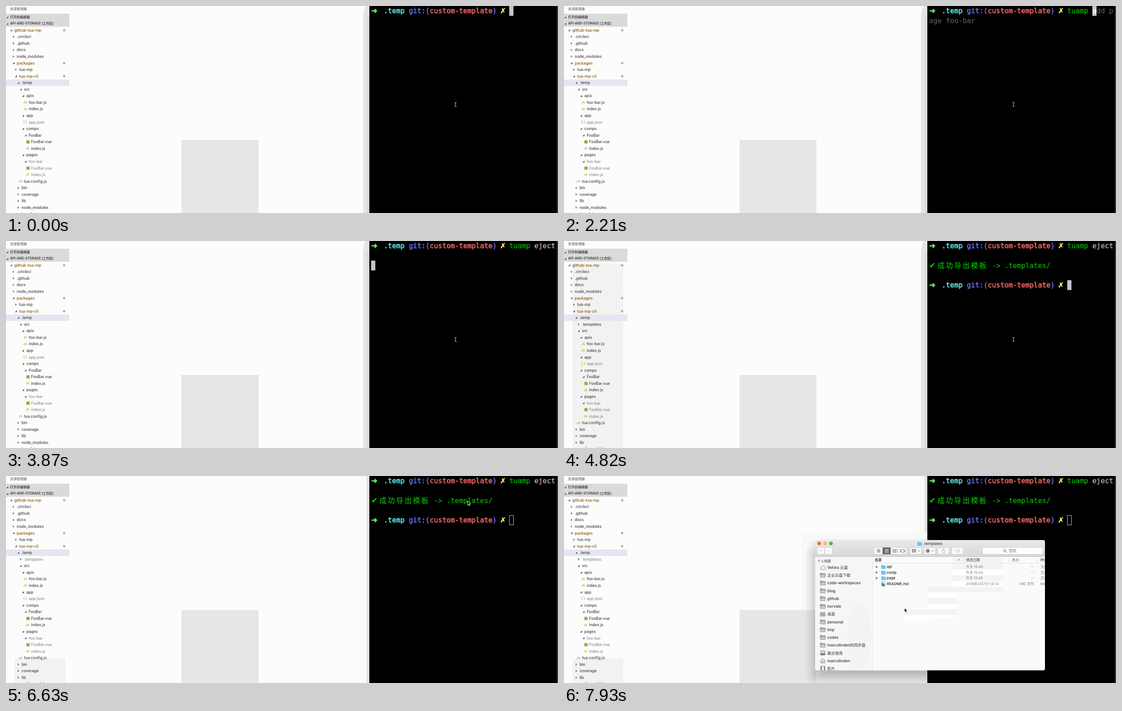
An HTML page with a canvas for the animation above (8 s loop, 1220 by 459 pixels).

```html
<!DOCTYPE html>
<html lang="zh">
<head>
<meta charset="utf-8">
<title>Template export</title>
<style>
html, body { margin: 0; width: 100%; height: 100%; overflow: hidden; background: #fcfcfc; }
canvas { display: block; width: 1220px; height: 459px; }
</style>
</head>
<body>
<canvas id="stage"></canvas>
<script>
const W = 1220, H = 459, LOOP = 8000;
const canvas = document.getElementById('stage');
const dpr = window.devicePixelRatio || 1;
canvas.width = W * dpr;
canvas.height = H * dpr;
const c = canvas.getContext('2d');

const SANS = 'Inter, "Noto Sans CJK SC", "Noto Sans CJK", sans-serif';
const MONO = '"DejaVu Sans Mono", "Noto Sans Mono", "Noto Sans CJK SC", monospace';
const SIGNS = '"DejaVu Sans", sans-serif';

// ---------- helpers ----------
function rect(x, y, w, h, fill) {
  c.fillStyle = fill;
  c.fillRect(x, y, w, h);
}
function round(x, y, w, h, r, fill, stroke) {
  c.beginPath();
  c.roundRect(x, y, w, h, r);
  if (fill) { c.fillStyle = fill; c.fill(); }
  if (stroke) { c.strokeStyle = stroke; c.lineWidth = 0.8; c.stroke(); }
}
function poly(points, fill, stroke, open) {
  c.beginPath();
  points.forEach(([x, y]) => c.lineTo(x, y));
  if (!open) c.closePath();
  if (fill) { c.fillStyle = fill; c.fill(); }
  if (stroke) { c.strokeStyle = stroke; c.stroke(); }
}
function disc(x, y, r, fill) {
  c.beginPath();
  c.arc(x, y, r, 0, 7);
  c.fillStyle = fill;
  c.fill();
}
function text(s, x, mid, size, fill, weight = 400, align = 'left') {
  c.font = `${weight} ${size}px ${SANS}`;
  c.textAlign = align;
  c.fillStyle = fill;
  c.fillText(s, x, mid + size * 0.35);
}
// Latest entry of a [time, ...values] list that has started.
const latest = (list, t) => list.filter(e => e[0] <= t).pop();

// ---------- file tree ----------
// depth, name, state: m modified, i ignored, + collapsed folder
const tree = [
  [0, 'github-tua-mp', 'm'], [1, '.circleci', '+'], [1, '.github', '+'], [1, 'docs', '+'],
  [1, 'node_modules', '+'], [1, 'packages', 'm'], [2, 'tua-mp', '+'], [2, 'tua-mp-cli', 'm'],
  [3, '.temp', ''], [4, 'src', ''], [5, 'apis', ''], [6, 'foo-bar.js', ''], [6, 'index.js', ''],
  [5, 'app', ''], [6, 'app.json', 'i'], [5, 'comps', ''], [6, 'FooBar', ''],
  [7, 'FooBar.vue', ''], [7, 'index.js', ''], [5, 'pages', ''], [6, 'foo-bar', 'i'],
  [7, 'FooBar.vue', 'i'], [7, 'index.js', 'i'], [4, 'tua.config.js', ''],
  [3, 'bin', '+'], [3, 'coverage', '+'], [3, 'lib', '+'], [3, 'node_modules', '+'], [3, 'templates', '+']
];

function treeIcon(name, state, x, y) {
  const icon = '#b5b53a';
  if (/\.js$/.test(name)) text('JS', x - 8, y, 6.6, icon, 700, 'center');
  else if (/\.json$/.test(name)) text('{ }', x - 8, y - 0.5, 7.4, icon, 700, 'center');
  else if (/\.vue$/.test(name)) rect(x - 10.5, y - 3.5, 7, 7, '#80b53c');
  else if (state.includes('+')) poly([[x - 8.5, y - 2.8], [x - 5.5, y], [x - 8.5, y + 2.8]], '#6a6a6a');
  else poly([[x - 5, y - 2.3], [x - 5, y + 2], [x - 9.3, y + 2]], '#505050');
}

function explorer(t) {
  if (t >= 4820) {
    const top = t < 6490 ? 50 : 405;
    rect(19, top, 112, H - top, '#f2f2f2');
  }
  text('资源管理器', 9, 6, 7.4, '#555');
  rect(0, 17, 140, 29, '#dadada');
  text('打开的编辑器', 9, 24.5, 7.3, '#4b4b4b', 700);
  text('API-AND-STORAGE (工作区)', 9, 39, 7.1, '#4b4b4b', 700);
  for (const y of [25, 39.5]) poly([[5, y - 2.3], [5, y + 2], [0.8, y + 2]], '#505050');
  rect(0, 163, 140, 14.3, '#e4e6f1');

  const rows = tree.slice();
  if (t >= 4820) rows.splice(9, 0, [4, '.templates', t < 5530 ? '+' : '+i']);
  rows.forEach(([depth, name, state], i) => {
    const x = 18.5 + depth * 5.3, y = 53.8 + i * 14.56;
    const modified = state.includes('m');
    treeIcon(name, state, x, y);
    text(name, x, y, 8.5, modified ? '#895503' : state.includes('i') ? '#8e8e90' : '#424242', 500);
    if (modified) disc(128.5, y, 2.6, '#c7ac84');
  });
}

// ---------- terminal ----------
const CW = 9.25, CH = 21.75, TX = 807, COLS = 44;
const typing = [
  [0, ''], [1620, 'tu'], [1740, 'tua'], [1970, 'tuam'], [2090, 'tuamp'], [2210, 'tuamp '],
  [2570, 'tuamp e'], [2690, 'tuamp ej'], [2800, 'tuamp eje'], [3030, 'tuamp ejec'], [3270, 'tuamp eject']
];

function mono(s, col, row, fill, heavy = 0, font = `15.37px ${MONO}`) {
  const x = TX + col * CW, y = row * CH + 16.4;
  c.font = font;
  c.textAlign = 'left';
  c.fillStyle = c.strokeStyle = fill;
  c.fillText(s, x, y);
  if (heavy) {
    c.lineWidth = heavy;
    c.lineJoin = 'round';
    c.strokeText(s, x, y);
  }
}
const sign = (s, col, row, fill, size) => mono(s, col, row, fill, 0.5, `${size}px ${SIGNS}`);

function prompt(row) {
  const part = (s, col, fill) => mono(s, col, row, fill, 0.5);
  sign('➜', 0, row, '#5ffa68', 17);
  part('.temp', 3, '#60fdff');
  part('git:(', 9, '#6871ff');
  part('custom-template', 14, '#ff6d67');
  part(')', 29, '#6871ff');
  sign('✗', 30.8, row, '#fffc67', 15.4);
}
function block(col, row, hollow) {
  const x = TX + col * CW, y = row * CH;
  if (hollow) {
    c.strokeStyle = '#c7c7c7';
    c.lineWidth = 1;
    c.strokeRect(Math.round(x) + 0.5, Math.round(y) + 0.5, 9, 21);
  } else rect(x, y, CW, CH, '#c7c7c7');
}

function commandLine(t) {
  const typed = latest(typing, t)[1];
  const full = !typed ? '' : t < 2570 ? 'tuamp add page foo-bar' : 'tuamp eject';
  const known = typed.length >= 5;
  const at = 33 + typed.length;
  if (t < 3870) block(at % COLS, Math.floor(at / COLS));
  [...full].forEach((ch, i) => {
    const col = (33 + i) % COLS, row = Math.floor((33 + i) / COLS);
    let color = '#5c5c5c';
    if (i < typed.length) color = known && i < 5 ? '#00c200' : '#c7c7c7';
    else if (i === typed.length) color = '#fff';
    mono(ch, col, row, color, 0.2);
    if (i < typed.length && !known) rect(TX + col * CW, 19, CW, 1, '#c7c7c7');
  });
}

function terminal(t) {
  rect(803, 0, 417, H, '#000');
  rect(1217.5, 0, 2.5, H, '#263b43');
  prompt(0);
  commandLine(t);
  if (t >= 3870 && t < 4220) block(0, 2);
  if (t >= 4220) {
    sign('✔', 0, 2, '#00c200', 17);
    [...'成功导出模板'].forEach((ch, i) => mono(ch, 2 + i * 2, 2, '#00c200', 0.2));
    mono('-> .templates/', 15, 2, '#00c200', 0.2);
    prompt(4);
    block(33, 4, t >= 6630);
  }
}

function terminalShadow(t) {
  if (t < 6630) {
    c.beginPath();
    c.moveTo(803, 0);
    c.lineTo(795, 0);
    c.quadraticCurveTo(789, 10, 789, 28);
    c.lineTo(789, H);
    c.lineTo(803, H);
    c.fillStyle = '#e5e5e5';
    c.fill();
    rect(797, 24, 6, H, '#dbdbdb');
  } else {
    const h = t < 6810 ? H : 125;
    rect(784, 0, 13, h, '#f8f9f8');
    rect(797, 0, 6, h, '#e2e2e2');
  }
}

// ---------- file window ----------
const places = [
  ['Velora 云盘', 'cloud'], ['企业云盘下载'], ['code-workspaces'], ['blog'], ['github'], ['norvale'],
  ['桌面', 'desk'], ['personal'], ['tmp'], ['codes'], ['marcolinden的同步盘'],
  ['最近使用', 'recent'], ['marcolinden', 'home'], ['影片', 'film']
];
const files = [
  ['api', '今天 15:45', '--', '文件夹'], ['comp', '今天 15:45', '--', '文件夹'],
  ['page', '今天 15:45', '--', '文件夹'], ['README.md', '2019年3月7日 14:33', '490 字节', 'Markdown']
];

function folder(x, y) {
  round(x, y - 4, 5, 3, 1, '#55b4e0');
  round(x, y - 3, 10.5, 7.5, 1, '#6cc7f0');
}

function placeIcon(kind, y) {
  const x = 566.5, ink = '#707070';
  c.lineWidth = 1;
  c.strokeStyle = ink;
  if (kind === 'cloud') {
    c.beginPath();
    c.arc(569.5, y + 1.5, 2.7, 1.57, 4.6);
    c.arc(573, y - 0.5, 3.4, 3.5, 5.9);
    c.arc(575.7, y + 1.7, 2.5, 5, 1.57);
    c.closePath();
    c.stroke();
  } else if (kind === 'home') {
    poly([[566, y + 0.5], [572, y - 5], [578, y + 0.5]], null, ink, true);
    poly([[568, y], [568, y + 5], [570.5, y + 5], [570.5, y + 1], [573.5, y + 1], [573.5, y + 5], [576, y + 5], [576, y]], null, ink, true);
  } else if (kind === 'film') {
    round(567.5, y - 5, 9, 10, 0.5, '#e6e6e6', ink);
    rect(567, y - 5, 2.2, 10, ink);
    rect(575, y - 5, 2.2, 10, ink);
  } else if (kind === 'recent') {
    round(567, y - 5, 10, 9.5, 1, '#d5d5d5', ink);
    rect(567, y + 1, 10, 3.5, ink);
  } else {
    round(x, y - 4, 11, 8.5, 0.8, '#cfcfcf', ink);
    if (kind === 'desk') {
      for (let i = 0; i < 3; i++) rect(568, y - 2 + i * 2, 8, 0.8, ink);
    } else {
      rect(x, y - 5, 5, 1.5, ink);
      rect(x, y - 2, 11, 0.9, ink);
    }
  }
}

function chevron(x, y, dx, dy, ink) {
  c.lineWidth = 1;
  const s = dx ? [[x - dx, y - 3], [x + dx, y], [x - dx, y + 3]] : [[x - 2.3, y - dy], [x, y + dy], [x + 2.3, y - dy]];
  poly(s, null, ink, true);
}

function toolbar() {
  const ink = '#606060', y = 166;
  const button = (x, w) => round(x, 158.5, w, 15, 2, '#fafafa', '#cacaca');
  button(560, 16); button(577, 16);
  chevron(568, y, -1.5, 0, '#999');
  chevron(585, y, 1.5, 0, '#bbb');
  button(686, 72);
  rect(704, 158.5, 18, 15, '#676767');
  rect(739.5, 159, 0.7, 14, '#ccc');
  for (const i of [0, 1]) for (const j of [0, 1]) round(692 + i * 4, 162.7 + j * 4, 2.6, 2.6, 0.3, null, ink);
  for (let i = 0; i < 4; i++) rect(709, 162 + i * 2.3, 8.5, 0.9, '#f4f4f4');
  for (let i = 0; i < 3; i++) round(726 + i * 3.3, 163, 3.3, 6, 0, null, ink);
  round(745.5, 163, 6, 6, 0, null, ink);
  rect(743, 163, 1, 6.5, ink);
  rect(753.3, 163, 1, 6.5, ink);

  button(765, 25); button(796, 25); button(826, 25); button(857, 25);
  for (let i = 0; i < 9; i++) rect(769 + i % 3 * 3.3, 162 + Math.floor(i / 3) * 2.8, 2.4, 1.9, ink);
  chevron(784.5, y, 0, 1.2, ink);
  chevron(815, y, 0, 1.2, ink);
  c.save();
  c.translate(804, y);
  for (let i = 0; i < 8; i++) { c.rotate(Math.PI / 4); rect(-0.7, -4.6, 1.4, 3, ink); }
  c.restore();
  disc(804, y, 3.2, ink);
  disc(804, y, 1.2, '#fafafa');
  round(835.5, 164.5, 6.5, 6, 0.4, null, '#aaa');
  rect(838.4, 160.8, 0.9, 6.5, '#aaa');
  poly([[836.7, 162.5], [838.8, 160.4], [841, 162.5]], null, '#aaa', true);
  poly([[863.5, y], [866, 163.3], [874, 163.3], [874, 168.7], [866, 168.7]], null, '#aaa');

  round(925, 158.5, 133, 15, 2, '#fefefe', '#cfcfcf');
  c.beginPath();
  c.arc(974, 165.5, 2.7, 0, 7);
  c.moveTo(976, 167.5);
  c.lineTo(979, 170.3);
  c.strokeStyle = '#666';
  c.lineWidth = 1;
  c.stroke();
  text('搜索', 983, 166, 8.6, '#858585');
}

const ROW = 12.55;
// Striped rows show up where the pointer has passed.
function stripes(x, y, w, h) {
  c.save();
  c.beginPath();
  c.rect(x, y, w, h);
  c.clip();
  for (let i = 0; i < 11; i++) rect(x, 195.2 + i * ROW, w, ROW, i % 2 ? '#fff' : '#f3f3f3');
  c.restore();
}

function fileList(t) {
  rect(683, 179, 380, 252, '#f9fafa');
  if (t >= 7340) {
    rect(859, 180, 111, 13, '#f3f3f3');
    stripes(859, 195, 111, 65);
  }
  if (t >= 7460) stripes(804, 245, 64, 63);
  if (t >= 7580) stripes(804, 295, 64, 19);
  if (t >= 7930) stripes(751, 293, 62, 26);

  rect(683, 193, 380, 0.8, '#dcdcdc');
  for (const x of [883, 982, 1047]) rect(x, 180, 0.8, 12.5, '#d8d8d8');
  text('名称', 687, 186, 7.5, '#333', 700);
  chevron(873, 186, 0, -1.2, '#555');
  text('修改日期', 889, 186, 7.5, '#333', 500);
  text('大小', 990, 186, 7.5, '#333', 500);
  text('种类', 1053, 186, 7.5, '#333', 500);

  files.forEach(([name, date, size, kind], i) => {
    const y = 201.5 + i * ROW;
    if (i < 3) {
      poly([[689, y - 3], [694, y], [689, y + 3]], '#808080');
      folder(701, y);
    } else {
      poly([[702, y - 5], [707.5, y - 5], [710, y - 2.5], [710, y + 5], [702, y + 5]], '#e9f4ed', '#8fb59e');
      rect(702, y - 2, 5, 6.5, '#38a169');
      rect(704, y + 1, 5, 3.5, '#3e7f8c');
    }
    text(name, 713.5, y, 8, '#222', 500);
    text(date, 888, y, 7.9, '#7d7d7d');
    text(size, 1039, y, 7.9, '#7d7d7d', 400, 'right');
    text(kind, 1053, y, 7.9, '#7d7d7d');
  });
}

// Pale patch around the window, meeting the terminal's edge in a curve.
function windowHalo() {
  rect(526, 125, 277, H - 125, '#f7f9f8');
  c.beginPath();
  c.moveTo(784, 111);
  c.quadraticCurveTo(784, 125, 770, 125);
  c.lineTo(784, 125);
  c.fill();
}

function windowShadow() {
  c.save();
  c.beginPath();
  c.rect(526, 125, 277, H - 125);
  c.clip();
  for (const e of [20, 14, 9, 5, 1, -3, -7, -11]) {
    round(555 - e, 160 - e, 508 + e * 2, 289 + e * 2, 14 + Math.max(e, 0), 'rgba(0,0,0,0.035)');
  }
  c.restore();
}

function fileWindow(t) {
  windowShadow();
  c.save();
  c.beginPath();
  c.roundRect(555, 142, 508, 289, 4);
  c.clip();
  const bar = c.createLinearGradient(0, 142, 0, 179);
  bar.addColorStop(0, '#eaeaea');
  bar.addColorStop(1, '#d6d6d6');
  rect(555, 142, 508, 37, bar);
  rect(555, 178, 508, 1, '#bdbdbd');
  ['#fc605c', '#fdbc40', '#34c749'].forEach((color, i) => disc(564 + i * 13, 149.6, 4, color));
  folder(781, 150);
  text('.templates', 794, 150, 8.5, '#404040', 500);
  toolbar();

  rect(555, 179, 128, 252, '#f5f6f6');
  c.beginPath();
  c.ellipse(652, 358, 27, 72, 0, 0, 7);
  c.fillStyle = '#f1f3f4';
  c.fill();
  rect(682.5, 179, 0.8, 252, '#d5d5d5');
  text('个人收藏', 560, 188, 7.4, '#777', 700);
  places.forEach(([name, kind], i) => {
    const y = 203 + i * 17.23;
    placeIcon(kind, y);
    text(name, 582, y, 8.5, '#333', 500);
  });
  fileList(t);
  c.restore();
}

// ---------- mouse ----------
const beam = [
  [0, 993, 218], [5290, 996, 203], [5410, 1003, 165], [5530, 1009, 120],
  [5650, 1013, 85], [5770, 1015, 72], [6130, 1018, 66], [6250, 1020, 61]
];
const arrow = [
  [6490, 1020, 55], [7200, 963, 123], [7340, 861, 247], [7460, 805, 295],
  [7580, 796, 302], [7700, 785, 306], [7930, 752.5, 292.5]
];

function mouse(t) {
  c.lineWidth = 1;
  if (t < 6490) {
    const [, x, y] = latest(beam, t);
    c.beginPath();
    c.moveTo(x - 2, y - 4.5);
    c.quadraticCurveTo(x + 0.5, y - 4.5, x + 0.5, y - 2);
    c.lineTo(x + 0.5, y + 3);
    c.quadraticCurveTo(x + 0.5, y + 5, x - 2, y + 5);
    c.moveTo(x + 3, y - 4.5);
    c.quadraticCurveTo(x + 0.5, y - 4.5, x + 0.5, y - 2);
    c.moveTo(x + 0.5, y + 3);
    c.quadraticCurveTo(x + 0.5, y + 5, x + 3, y + 5);
    c.strokeStyle = '#d0d0d0';
    c.stroke();
    return;
  }
  const [, x, y] = latest(arrow, t);
  const shape = [[0, 0], [0, 9.6], [2.2, 7.6], [3.7, 11.2], [5.3, 10.5], [3.8, 7], [6.7, 6.8]];
  poly(shape.map(([dx, dy]) => [x + dx, y + dy]), '#000', '#fff');
}

// ---------- scene ----------
function draw(t) {
  c.setTransform(dpr, 0, 0, dpr, 0, 0);
  rect(0, 0, W, H, '#fcfcfc');
  const open = t >= 6810;
  if (open) windowHalo();
  rect(388, 297, 170, 170, '#e6e6e6');
  explorer(t);
  terminalShadow(t);
  terminal(t);
  if (open) fileWindow(t);
  mouse(t);
}

const start = performance.now();
function frame() {
  draw((performance.now() - start) % LOOP);
  requestAnimationFrame(frame);
}
frame();
</script>
</body>
</html>
```
